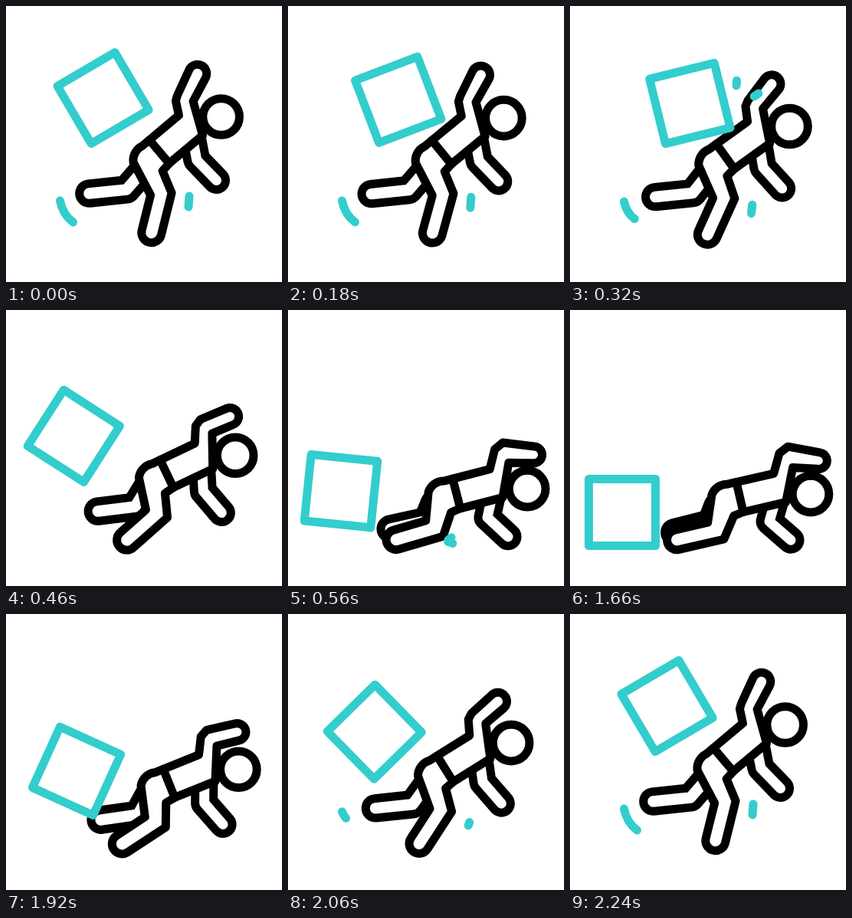
Write an HTML page that moves like this. It is 360x360 px and loops after 2.42 s.

```html
<!DOCTYPE html>
<html lang="en">
<head>
<meta charset="utf-8">
<title>Falling box</title>
<style>
  html, body { margin: 0; width: 100%; height: 100%; overflow: hidden; background: #fff; }
  svg { display: block; width: 100%; height: 100%; }
  path, circle, rect { stroke-linecap: round; stroke-linejoin: round; }
  .ink { fill: #fff; stroke: #000; stroke-width: 11; }
  .line { fill: none; stroke: #000; stroke-width: 11; }
  .hollow { fill: none; stroke: #fff; }
  .teal { fill: none; stroke: #33cdcd; stroke-width: 11; }
</style>
</head>
<body>
<svg viewBox="0 0 360 360">
  <path id="legOut" class="line" style="stroke-width:36.5"/>
  <path id="legIn" class="hollow" stroke-width="14.5"/>
  <path id="armOut" class="line" style="stroke-width:35"/>
  <path id="armIn" class="hollow" stroke-width="13"/>
  <path id="body" class="ink"/>
  <path id="waist" class="line"/>
  <circle id="head" class="ink" r="23.8"/>
  <rect id="box" class="teal" x="-43.5" y="-43.5" width="87" height="87"/>
  <path id="trail" class="teal"/>
  <path id="tick" class="teal"/>
  <path id="hit" class="teal"/>
  <path id="dust" class="teal"/>
</svg>
<script>
const LOOP = 2420, HIT = 320, BODY_DOWN = 574, BOX_DOWN = 590, RISE = 1670, UP = 2240;
const MID = 0.235;

// Each joint at the start, at MID and at rest; angles in degrees on the stage
const RIG = {
  x: [200, 205, 221.5],
  y: [190, 202, 244],
  spine: [-40, -32, -13],
  handX: [103.5, 105, 111],
  handY: [-46, -38, -23],
  thigh: [64, 72, 105],
  shin: [104, 123, 167],
  backThigh: [131, 126, 111],
  backShin: [174, 174, 166],
  backArm: [79, 82, 106],
  backHand: [46, 49, 41]
};

const $ = id => document.getElementById(id);
const set = (id, d) => $(id).setAttribute('d', d);
const show = (id, on) => $(id).style.display = on ? '' : 'none';
const mix = (a, b, u) => a + (b - a) * u;
const span = (t, a, b) => Math.max(0, Math.min(1, (t - a) / (b - a)));
const smooth = u => u * u * (3 - 2 * u);
const step = ([x, y], deg, len) => {
  const a = deg * Math.PI / 180;
  return [x + len * Math.cos(a), y + len * Math.sin(a)];
};
const text = p => p.map(v => v.toFixed(2)).join(' ');
const poly = (...pts) => 'M' + pts.map(text).join('L');

// Quadratic through the three values of a joint
function joint([a, b, c], q) {
  return a * (q - MID) * (q - 1) / MID +
    b * q * (q - 1) / (MID * (MID - 1)) +
    c * q * (q - MID) / (1 - MID);
}

function drawBody(q) {
  const r = {};
  for (const name in RIG) r[name] = joint(RIG[name], q);
  // Torso space: x along the spine, y towards the belly, zero at the waist
  const at = (x, y) => step(step([r.x, r.y], r.spine, x), r.spine + 90, y);

  const arm0 = at(43, 17), arm1 = step(arm0, r.backArm, 26);
  const arm = poly(arm0, arm1, step(arm1, r.backHand, 37));
  set('armOut', arm);
  set('armIn', arm);

  const leg0 = at(-31, 5), leg1 = step(leg0, r.backThigh, mix(34, 24, q));
  const leg = poly(leg0, leg1, step(leg1, r.backShin, 49));
  set('legOut', leg);
  set('legIn', leg);

  const knee = step(at(-24, 5), r.thigh, mix(40, 35, q));
  const foot = step(knee, r.shin, 52);
  const bend = (r.thigh + r.shin) / 2 + 90;
  const wide = 13 / Math.cos((r.shin - r.thigh) * Math.PI / 360);

  const elbow = [65 + 11 * q, -41 - 9 * q], pit = [76, -22];
  const hand = at(r.handX, r.handY);
  const lean = Math.atan2(r.handY - (elbow[1] + pit[1]) / 2, r.handX - (elbow[0] + pit[0]) / 2);
  const across = r.spine + lean * 180 / Math.PI + 90;
  const grip = mix(12, 10.8, q);

  set('body',
    poly(step(hand, across, -grip), at(...elbow), at(59 + 4 * q, -37 - 7 * q), at(50, -20), at(-12, -20)) +
    'A21 21 0 0 0 ' + text(at(-35, -11)) +
    'L' + text(step(knee, bend, wide)) + 'L' + text(step(foot, r.shin + 90, 13)) +
    'A1 1 0 0 0 ' + text(step(foot, r.shin - 90, 13)) +
    poly(step(knee, bend, -wide), at(-13, 22), at(0, 20), at(57, 20), at(...pit), step(hand, across, grip)).replace('M', 'L') +
    'A1 1 0 0 0 ' + text(step(hand, across, -grip)) + 'Z');
  set('waist', poly(at(0, -20), at(0, 20)));

  const [hx, hy] = at(91, 17);
  $('head').setAttribute('cx', hx);
  $('head').setAttribute('cy', hy);
}

function boxAt(t) {
  if (t < HIT) {
    const u = t / HIT;
    return [mix(126.5, 157, u), mix(120, 127, u * u), mix(-30.5, -13.5, u)];
  }
  if (t < RISE) {
    const u = span(t, HIT, BOX_DOWN), v = 1 - u;
    return [mix(157, 68, 1 - v * v), mix(127, 264, u * u), mix(-13.5, -90, 1 - v ** 1.15)];
  }
  const u = smooth(span(t, RISE, UP));
  return [mix(68, 126.5, u), mix(264, 120, u), mix(-90, -30.5, u)];
}

function drawMarks(t, q) {
  const k = 1 - (q / 0.28) ** 2;
  show('trail', k > 0);
  show('tick', k > 0);
  if (k > 0) {
    const y = 254 + 70 * q * q;
    set('trail', `M70.5 ${y}Q${72 + 2 * k} ${y + 18 * k} ${70.5 + 17 * k} ${y + 28 * k}`);
    const m = 255 + 80 * q, h = 7 * k;
    set('tick', `M${239 - 10 * q} ${m - h}L${238 - 12 * q} ${m + h}`);
  }

  const s = span(t, 270, 400), a = Math.sin(Math.PI * s);
  show('hit', s > 0 && s < 1);
  set('hit', `M217.5 ${101 - 4 * a}L217 ${101 + 3 * a}M${243 - 3 * a} ${116 + 2 * a}L${243 + 3 * a} ${116 - 2 * a}`);

  const d = span(t, 535, 720), e = Math.sin(Math.PI * d), g = 6 * d;
  show('dust', d > 0 && d < 1);
  set('dust', `M${208 + g} ${301 - g}l${10 * e} ${-8 * e}M${208 + g} ${302 + g / 3}l${14 * e} ${5 * e}`);
}

function draw(t) {
  const q = t < RISE ? span(t, 0, BODY_DOWN) ** 3.6 : 1 - smooth(span(t, RISE, UP));
  drawBody(q);
  const [x, y, turn] = boxAt(t);
  $('box').setAttribute('transform', `translate(${x} ${y}) rotate(${turn})`);
  drawMarks(t, q);
}

const start = performance.now();
function tick() {
  draw(Math.max(0, performance.now() - start) % LOOP);
  requestAnimationFrame(tick);
}
tick();
</script>
</body>
</html>
```
